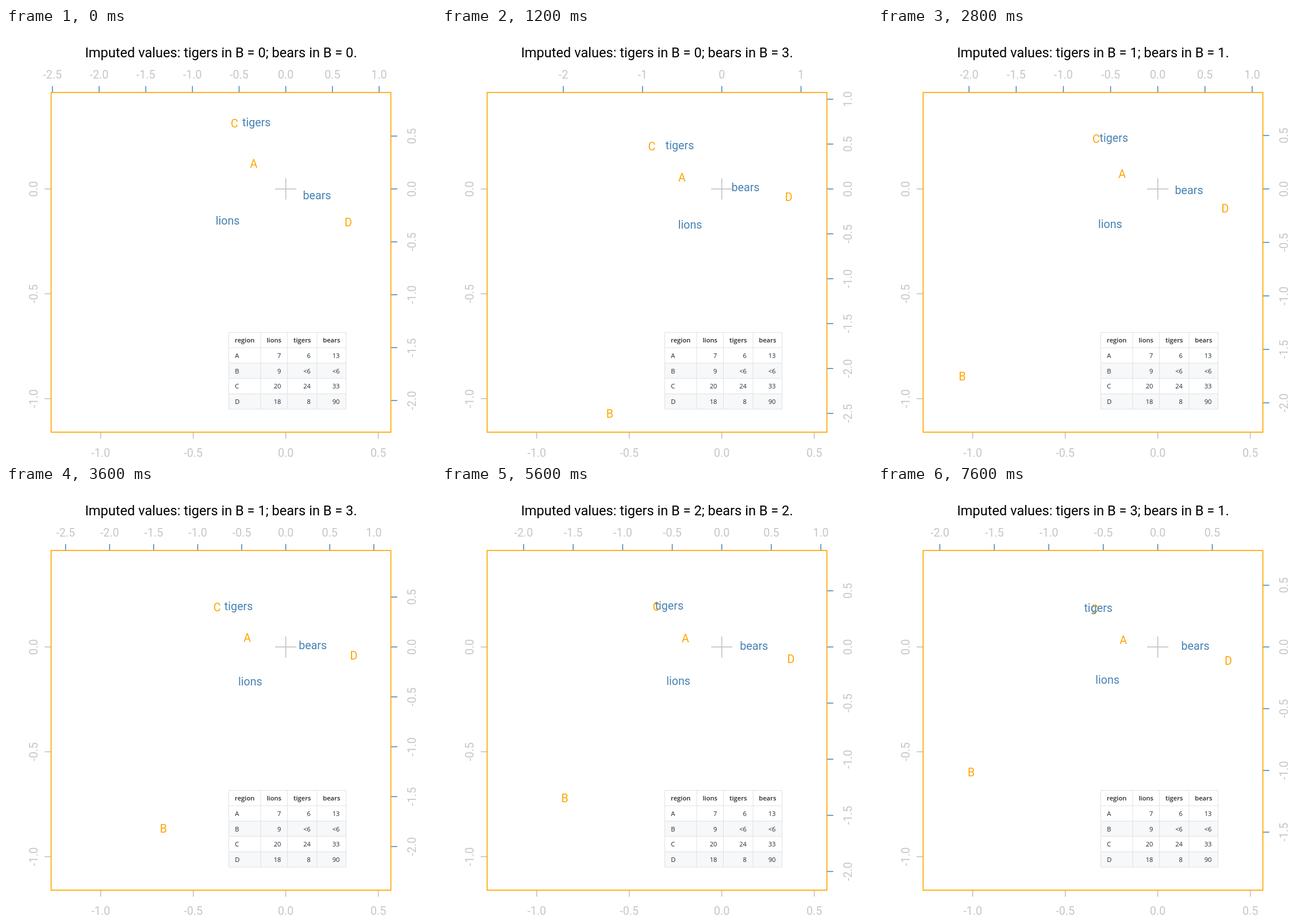
Recreate the animation shown at these times as an HTML page. Size 748 px wide and 748 px high, loop 8000 ms.

```html
<!DOCTYPE html>
<html lang="en">
<head>
<meta charset="utf-8">
<title>Correspondence analysis with imputed values</title>
<style>
  html, body { margin: 0; width: 100%; height: 100%; overflow: hidden; background: #fff; }
  svg { display: block; width: 100%; height: 100%; }
  text { white-space: pre; }
  .plot { font: 19.7px Roboto, sans-serif; }
  .title { font-size: 23.6px; }
  .table { font: 11.2px "Open Sans", "Noto Sans", sans-serif; fill: #24292e; }
  .head { font-weight: 600; }
</style>
</head>
<body>
<svg id="stage" viewBox="0 0 748 748"></svg>
<script>
const STEP = 400, STEPS = 20, BEARS = 6;
const ORANGE = "orange", BLUE = "steelblue", GREY = "#bebebe", LABEL = "#c6c6c6";
const BOX = { l: 78.5, t: 112.2, r: 669.5, b: 703.1 };
const XLIM = [-1.2, 0.5], YLIM = [-1.1, 0.4];
const LINE = 1.5, TICK = 11.2;

const svg = document.getElementById("stage");
const pen = document.createElement("canvas").getContext("2d");
pen.font = "19.7px Roboto, sans-serif";

function add(parent, tag, attrs, text) {
  const el = document.createElementNS("http://www.w3.org/2000/svg", tag);
  for (const k in attrs) el.setAttribute(k, attrs[k]);
  if (text !== undefined) el.textContent = text;
  parent.appendChild(el);
  return el;
}
const line = (g, x1, y1, x2, y2, stroke, w = LINE) =>
  add(g, "line", { x1, y1, x2, y2, stroke, "stroke-width": w });

// 4% padding on each side of the limits
function pad([lo, hi]) {
  const d = 0.04 * (hi - lo);
  return [lo - d, hi + d];
}
const xr = pad(XLIM), yr = pad(YLIM);
const px = x => BOX.l + (x - xr[0]) / (xr[1] - xr[0]) * (BOX.r - BOX.l);
const py = y => BOX.b - (y - yr[0]) / (yr[1] - yr[0]) * (BOX.b - BOX.t);

// Round tick positions inside [lo, hi], about five of them
function ticks([lo, hi]) {
  const cell = (hi - lo) / 5, base = 10 ** Math.floor(Math.log10(cell));
  let unit = base;
  for (const [m, h] of [[2, 0.8], [5, 1.7], [10, 0.8]])
    if (m * base - cell < h * (cell - unit)) unit = m * base;
  const digits = unit < 0.999 ? 1 : 0, out = [];
  for (let i = Math.ceil(lo / unit); i * unit <= hi; i++)
    out.push({ v: i * unit, s: (i * unit || 0).toFixed(digits) });
  return out;
}

function axis(g, side, ratio, colour) {
  const flat = side === "top" || side === "bottom";
  const near = side === "top" || side === "left";
  const edge = { top: BOX.t, bottom: BOX.b, left: BOX.l, right: BOX.r }[side];
  const end = edge + (near ? -TICK : TICK), base = edge + (near ? -24 : 43.3);
  for (const { v, s } of ticks((flat ? xr : yr).map(u => u * ratio))) {
    const p = flat ? px(v / ratio) : py(v / ratio);
    if (flat) line(g, p, edge, p, end, colour);
    else line(g, edge, p, end, p, colour);
    const place = flat ? `translate(${p} ${base})` : `translate(${base} ${p}) rotate(-90)`;
    add(g, "text", { transform: place, "text-anchor": "middle", fill: LABEL }, s);
  }
}

// Two-dimensional correspondence analysis of a table with three columns
function analyse(table) {
  const sum = a => a.reduce((p, q) => p + q, 0);
  const rows = table.map(sum), n = sum(rows), J = [0, 1, 2];
  const cols = J.map(j => sum(table.map(r => r[j])));
  const T = J.map(j => J.map(k =>
    sum(table.map((r, i) => r[j] * r[k] / rows[i])) / Math.sqrt(cols[j] * cols[k])));
  const cross = (a, b) => J.map(i => a[(i + 1) % 3] * b[(i + 2) % 3] - a[(i + 2) % 3] * b[(i + 1) % 3]);
  const dot = (a, b) => sum(a.map((v, i) => v * b[i]));
  const half = (T[0][0] + T[1][1] + T[2][2] - 1) / 2;
  const root = Math.sqrt(half * half - dot(T[0], cross(T[1], T[2])));

  const dims = [half + root, half - root].map((val, d) => {
    const M = T.map((r, i) => r.map((v, j) => i === j ? v - val : v));
    const vec = cross(M[0], M[1]);
    // bears point right, tigers point up
    const len = Math.sqrt(dot(vec, vec)) * Math.sign(d ? vec[1] : vec[2]);
    const std = vec.map((v, j) => v / len / Math.sqrt(cols[j] / n));
    return {
      row: table.map((r, i) => dot(r, std) / rows[i]),
      col: std.map(v => v * Math.sqrt(val))
    };
  });
  const pairs = key => dims[0][key].map((x, i) => [x, dims[1][key][i]]);
  return { rows: pairs("row"), cols: pairs("col") };
}

// How far the column points must shrink to share the row axes
function fit({ rows, cols }) {
  const ends = (pts, d) => {
    const v = pts.map(p => p[d]);
    return [Math.abs(Math.min(...v)), Math.abs(Math.max(...v))];
  };
  return Math.max(...[0, 1].flatMap(d => {
    const r = ends(rows, d);
    return ends(cols, d).map((v, i) => v / r[i]);
  }));
}

function mark(g, x, y, s, fill) {
  const m = pen.measureText(s);
  const drop = (m.actualBoundingBoxAscent - m.actualBoundingBoxDescent) / 2;
  add(g, "text", { x: px(x), y: py(y) + drop, "text-anchor": "middle", fill }, s);
}

function drawTable(g) {
  const xs = [387.5, 443, 489.5, 541, 591.5], y0 = 529.5, h = 26.7;
  const cells = [["region", "lions", "tigers", "bears"], ["A", 7, 6, 13],
    ["B", 9, "<6", "<6"], ["C", 20, 24, 33], ["D", 18, 8, 90]];
  cells.forEach((row, i) => {
    const y = y0 + i * h;
    add(g, "rect", { x: xs[0], y, width: xs[4] - xs[0], height: h,
      fill: i && i % 2 === 0 ? "#f6f8fa" : "#fff" });
    row.forEach((s, j) => {
      const at = !i ? [(xs[j] + xs[j + 1]) / 2, "middle"]
        : j ? [xs[j + 1] - 11, "end"] : [xs[0] + 10.7, "start"];
      add(g, "text", { x: at[0], y: y + 17.6, "text-anchor": at[1], class: i ? "" : "head" }, s);
    });
  });
  for (let i = 0; i <= 5; i++) line(g, xs[0], y0 + i * h, xs[4], y0 + i * h, "#dfe2e5", 1);
  for (const x of xs) line(g, x, y0, x, y0 + 5 * h, "#dfe2e5", 1);
}

const clip = add(add(svg, "defs", {}), "clipPath", { id: "inside" });
const frame = { x: BOX.l, y: BOX.t, width: BOX.r - BOX.l, height: BOX.b - BOX.t };
add(clip, "rect", frame);

const fixed = add(svg, "g", { class: "plot" });
axis(fixed, "left", 1, GREY);
axis(fixed, "bottom", 1, GREY);
const scales = add(svg, "g", { class: "plot" });
add(svg, "rect", { ...frame, fill: "none", stroke: ORANGE, "stroke-width": 1.7 });
const points = add(svg, "g", { class: "plot", "clip-path": "url(#inside)" });
const cx = px(0), cy = py(0), arm = 18.4;
line(svg, cx - arm, cy, cx + arm, cy, GREY);
line(svg, cx, cy - arm, cx, cy + arm, GREY);
drawTable(add(svg, "g", { class: "table" }));
const title = add(add(svg, "g", { class: "plot" }), "text",
  { class: "title", x: 374, y: 51, "text-anchor": "middle" });

let shown = -1;
function draw(ms) {
  const step = Math.floor(ms / STEP) % STEPS;
  if (step === shown) return;
  shown = step;
  const tigers = Math.floor(step / BEARS), bears = step % BEARS;
  const ca = analyse([[7, 6, 13], [9, tigers, bears], [20, 24, 33], [18, 8, 90]]);
  const ratio = fit(ca);

  title.textContent = `Imputed values: tigers in B = ${tigers}; bears in B = ${bears}.`;
  scales.replaceChildren();
  axis(scales, "top", ratio, BLUE);
  axis(scales, "right", ratio, BLUE);
  points.replaceChildren();
  ca.rows.forEach(([x, y], i) => mark(points, x, y, "ABCD"[i], ORANGE));
  ca.cols.forEach(([x, y], i) =>
    mark(points, x / ratio, y / ratio, ["lions", "tigers", "bears"][i], BLUE));
}

const start = performance.now();
function tick() {
  draw(performance.now() - start);
  requestAnimationFrame(tick);
}
tick();
</script>
</body>
</html>
```
